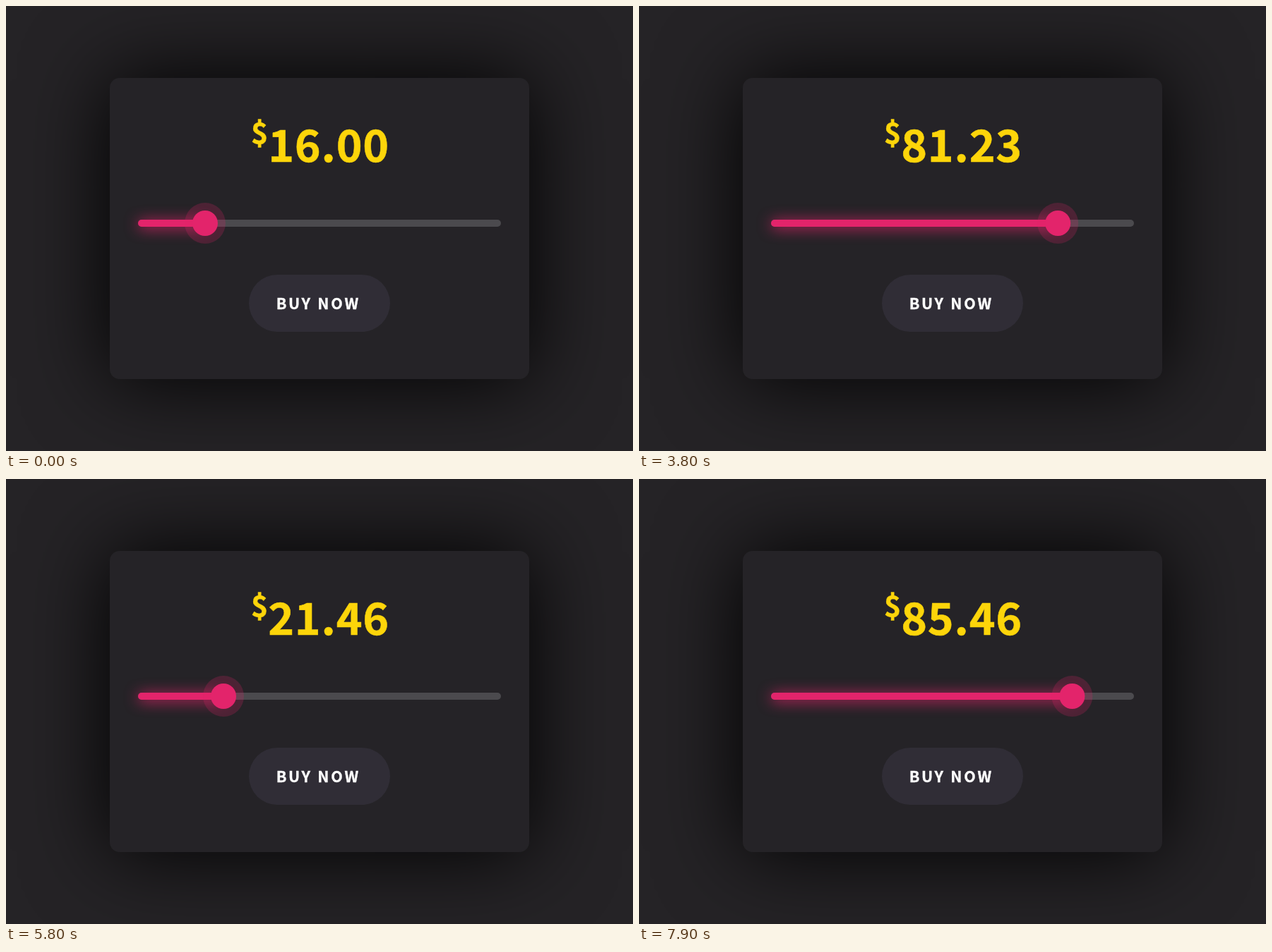
Recreate the animation shown at these times as an HTML page. Size 888 by 631 pixels, loop 8 s.

```html
<!DOCTYPE html>
<html lang="en">
<head>
<meta charset="utf-8">
<title>Price slider</title>
<style>
  html, body { margin: 0; width: 100%; height: 100%; overflow: hidden; background: #252326; }
  div, svg { position: absolute; }
  #stage { left: 0; top: 0; width: 888px; height: 631px; overflow: hidden; }
  .card { left: 147px; top: 102px; width: 594px; height: 427px; border-radius: 14px;
          background: #252327; box-shadow: 0 0 120px #000; }
  .track, #fill { left: 187px; top: 303px; width: 514px; height: 10px; border-radius: 5px; }
  .track { background: #4b4a4e; }
  #fill { background: #e3246b; box-shadow: 0 2px 20px #e3246b; }
  #thumb { left: -18.2px; top: 289.8px; width: 36.4px; height: 36.4px; border-radius: 50%;
           background: #e3246b; box-shadow: 0 0 0 11px rgba(227, 36, 107, .21); }
  .button { left: 344px; top: 380.5px; width: 200px; height: 81px; border-radius: 40.5px; background: #302d36; }
  text { font-family: "Noto Sans CJK JP", "Noto Sans CJK SC", "Noto Sans CJK", sans-serif; font-weight: 700; }
  .price { fill: #fdd50a; stroke: #fdd50a; stroke-width: .6px; }
  .currency { font-size: 41px; }
  #amount { font-size: 62.5px; letter-spacing: .8px; }
  .label { fill: #fff; stroke: #fff; stroke-width: .4px; font-size: 21.5px; letter-spacing: 2.75px; }
</style>
</head>
<body>
<div id="stage">
  <div class="card"></div>
  <div class="track"></div>
  <div id="fill"></div>
  <div id="thumb"></div>
  <div class="button"></div>
  <svg width="888" height="631">
    <text class="price currency" x="347" y="195.3">$</text>
    <text class="price" id="amount" x="371.2" y="220.7">16.00</text>
    <text class="label" x="382.7" y="430">BUY NOW</text>
  </svg>
</div>
<script>
  const LOOP = 8000, STEP = 100, START_PRICE = 16;
  const linear = u => u;
  const easeIn = power => u => u ** power;
  const easeOut = power => u => 1 - (1 - u) ** power;

  // Drags of the thumb, with rests between some of them
  const drags = [
    { from: 1600, until: 3000, price: 62.15, ease: easeIn(1.311) },
    { from: 3100, until: 3300, price: 71.54, ease: linear },
    { from: 3500, until: 3800, price: 81.23, ease: linear },
    { from: 3900, until: 4100, price: 89.08, ease: linear },
    { from: 4400, until: 5300, price: 57.5, ease: easeIn(2.57) },
    { from: 5300, until: 6500, price: 12.6, ease: easeOut(3.011) },
    { from: 6900, until: 7300, price: 22.85, ease: easeIn(1.8) },
    { from: 7300, until: 7900, price: 85.46, ease: easeOut(1.1) }
  ];
  const fill = document.getElementById("fill");
  const thumb = document.getElementById("thumb");
  const amount = document.getElementById("amount");

  function priceAt(time) {
    return drags.reduce((price, drag) => {
      const u = (time - drag.from) / (drag.until - drag.from);
      return price + (drag.price - price) * drag.ease(Math.min(1, Math.max(0, u)));
    }, START_PRICE);
  }

  function draw(now) {
    const price = priceAt(Math.floor(now % LOOP / STEP) * STEP);
    const x = 205.6 + 4.772 * price;
    fill.style.width = x - 187 + "px";
    thumb.style.transform = `translateX(${x}px)`;
    amount.textContent = price.toFixed(2);
  }

  const start = performance.now();
  function tick() {
    draw(performance.now() - start);
    requestAnimationFrame(tick);
  }
  tick();
</script>
</body>
</html>
```
